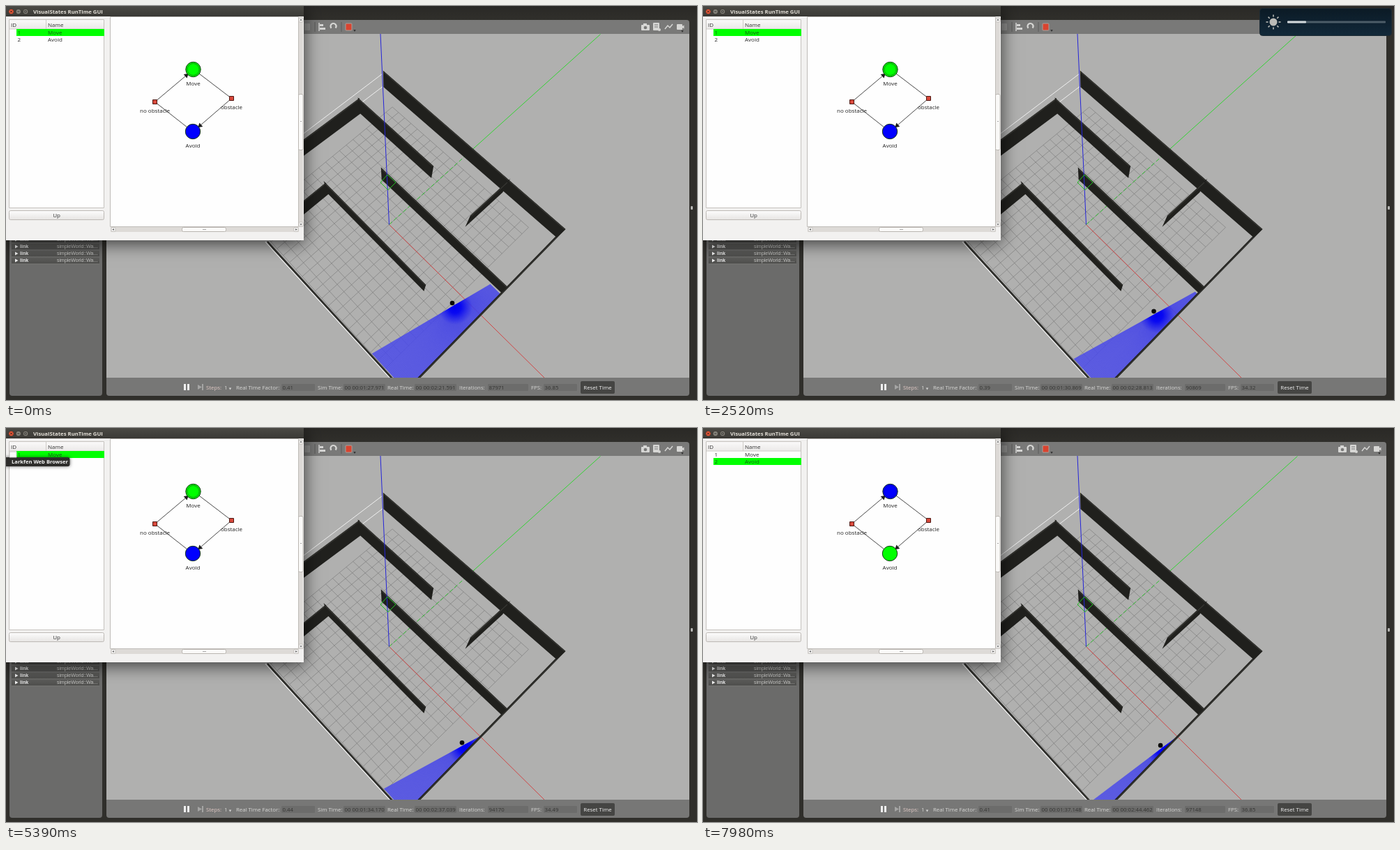
Recreate the animation shown at these times as an HTML page with a canvas. Size 991 by 565 pixels, loop 8 s.

```html
<!DOCTYPE html>
<html lang="en">
<head>
<meta charset="utf-8">
<title>Robot state machine</title>
<style>
html, body { margin: 0; width: 100%; height: 100%; overflow: hidden; background: #2f2e2a; }
canvas { display: block; }
</style>
</head>
<body>
<canvas id="stage" width="991" height="565"></canvas>
<script>
const ctx = document.getElementById('stage').getContext('2d');
const LOOP = 8000, TICK = 70;
const SWITCH = 6400;                       // Move -> Avoid
const UI = '"Open Sans", sans-serif', SMALL = '"Liberation Sans", sans-serif';
const FLOOR = [[709, 413], [590, 535], [558, 535], [470, 438], [640, 345]];
const NADIR = [555, 548];                  // vanishing point of the verticals

const ramp = (t, from, to) => Math.max(0, Math.min(1, (t - from) / (to - from)));
const mix = (a, b, k) => a.map((v, i) => v + (b[i] - v) * k);

function rect(x, y, w, h, fill, radius = 0, stroke) {
  ctx.beginPath();
  ctx.roundRect(x, y, w, h, radius);
  paint(fill, stroke);
}
function paint(fill, stroke, width = 1) {
  if (fill) { ctx.fillStyle = fill; ctx.fill(); }
  if (stroke) { ctx.strokeStyle = stroke; ctx.lineWidth = width; ctx.stroke(); }
}
function trace(points, close) {
  ctx.beginPath();
  points.forEach(([x, y]) => ctx.lineTo(x, y));
  if (close) ctx.closePath();
}
function poly(points, fill, stroke, width) { trace(points, true); paint(fill, stroke, width); }
function line(color, width, ...points) { trace(points); paint(null, color, width); }
function circle(x, y, r, fill, stroke, width) {
  ctx.beginPath();
  ctx.arc(x, y, r, 0, 7);
  paint(fill, stroke, width);
}
function triangle(x, y, size, angle, fill) {
  const corner = i => [x + size * Math.cos(angle + i * 2.1), y + size * Math.sin(angle + i * 2.1)];
  poly([0, 1, 2].map(corner), fill);
}
function text(s, x, y, color, size = 8, align = 'left', weight = 400, family = UI) {
  ctx.font = `${weight} ${size}px ${family}`;
  ctx.textAlign = align;
  ctx.fillStyle = color;
  ctx.fillText(s, x, y + size * .35);
}
function shade(y0, y1, top, bottom) {
  const g = ctx.createLinearGradient(0, y0, 0, y1);
  g.addColorStop(0, top);
  g.addColorStop(1, bottom);
  return g;
}

// Ground plane to screen, u along the red axis, v along the green one
function ground(u, v) {
  const w = 1 - .0566 * u + .0444 * v;
  return [549.5 + (96.2 * u + 101.3 * v) / w, 313.5 + (94.8 * u - 90.9 * v) / w];
}

// A wall is given by its top edge; its foot lies towards the nadir
function wall(a, b) {
  poly([a, b, mix(b, NADIR, .046), mix(a, NADIR, .046)], '#20201d', '#20201d', 2.2);
  line('#363632', 1.2, a, b);
}

// Scanner position and the slope of the scan's edge
function scanner(t) {
  const moved = Math.min(t, 6200);
  const drift = 1 - (1 - ramp(t, 0, 4200)) ** 2;
  const turn = ramp(t, SWITCH + 100, LOOP) ** 1.5;
  return [643 + .0026 * moved, 429 + .0047 * moved, -.588 + .041 * drift - .213 * turn];
}

// The part of the floor on the lower side of the scan's edge
function clipFloor(x, y, slope) {
  const depth = p => p[1] - y - slope * (p[0] - x);
  const out = [];
  FLOOR.forEach((a, i) => {
    const b = FLOOR[(i + 1) % FLOOR.length], da = depth(a), db = depth(b);
    if (da >= 0) out.push(a);
    if (da * db < 0) out.push(mix(a, b, da / (da - db)));
  });
  return out;
}

function laser(x, y, slope) {
  ctx.save();
  trace(clipFloor(x, y, slope), true);
  ctx.clip();
  ctx.fillStyle = 'rgba(76,76,236,.82)';
  ctx.fillRect(460, 340, 260, 195);
  const start = Math.atan(slope);
  for (let i = 0; i <= 180; i++) {
    const a = start + Math.PI * i / 180;
    line('rgba(30,30,225,.2)', .6, [x, y], [x + 220 * Math.cos(a), y + 220 * Math.sin(a)]);
  }
  const glow = ctx.createRadialGradient(x + 1, y + 3, 0, x + 1, y + 3, 25);
  glow.addColorStop(0, '#0000f4');
  glow.addColorStop(.35, 'rgba(0,0,244,.85)');
  glow.addColorStop(1, 'rgba(20,20,240,0)');
  ctx.fillStyle = glow;
  ctx.fillRect(x - 40, y - 40, 80, 80);
  ctx.restore();
}

function scene(t) {
  const [x, y, slope] = scanner(t);
  ctx.save();
  ctx.beginPath();
  ctx.rect(144, 40, 836, 493);
  ctx.clip();
  ctx.fillStyle = '#b0b0af';
  ctx.fillRect(144, 40, 836, 493);

  for (let k = -1; k < 1.01; k += .1) {
    line('#7f7f7e', .7, ground(k, -1), ground(k, 1));
    line('#7f7f7e', .7, ground(-1, k), ground(1, k));
  }
  line('#f0f0f0', 1, [420, 188], [540, 97]);
  line('#f0f0f0', 1, [420, 207], [541, 115]);

  const origin = ground(0, 0);
  line('#d04444', 1, origin, [772.5, 533.5]);
  ctx.setLineDash([6, 3]);
  line('#30c030', 1, origin, [672, 203]);
  ctx.setLineDash([]);
  line('#32d332', 1, [672, 203], [852.5, 40.5]);

  laser(x, y, slope);

  line('#f2f2f2', 1.3, [372, 338], [552, 535]);
  wall([375, 338], [555, 535]);
  wall([801, 320], [591, 535]);
  wall([542, 95], [801, 320]);
  wall([719, 253], [667, 301]);
  wall([420, 198], [506, 134]);
  wall([506, 134], [612, 230]);
  wall([539, 234], [718, 403]);
  wall([420, 286], [458, 255]);
  wall([458, 255], [601, 400]);

  line('#2424d8', 1, origin, [537, 40]);
  poly([[547, 242], [559, 253], [548, 264], [537, 253]], null, '#22c022', 1);
  circle(x - 3, y - 3, 3.3, '#080808');
  ctx.restore();
}

function toolbar() {
  const ink = '#d6d6d4', ground = '#797978';
  rect(144, 20, 836, 20, ground, [4, 4, 0, 0]);
  rect(428, 25, 8, 10, '#8f8f8e', 1);
  for (const x of [443, 481]) line('#5c5c5b', 1, [x, 23], [x, 37]);
  line(ink, 1.5, [449, 24], [449, 36]);
  rect(450, 26, 5, 3, ink);
  rect(450, 31, 8, 3, ink);
  ctx.beginPath();
  ctx.arc(469.5, 29, 4, 2.4, .7);
  paint(null, ink, 2.2);
  rect(487, 25, 9, 10, '#d9432f', 1, '#a8a19c');
  triangle(500, 35, 2, Math.PI / 2, '#333');

  rect(911, 27, 12, 8, ink, 1);
  rect(914, 25, 5, 3, ink);
  circle(917, 31, 2.3, ground);
  rect(928, 24, 9, 11, ink, 1);
  for (const y of [27, 30]) line(ground, 1, [930, y], [935, y]);
  circle(937, 34, 2, ink);
  line(ink, 1.5, [945, 33], [949, 28], [952, 31], [956, 26]);
  rect(962, 26, 8, 8, ink, 1);
  triangle(971, 30, 3, Math.PI, ink);
  triangle(970, 36, 2, Math.PI / 2, '#333');
}

function clock(seconds) {
  return '00 ' + new Date(Math.round(seconds * 1000)).toISOString().slice(11, 23);
}

function statusBar(t) {
  const sim = 87.971 + t * .00115, real = 141.591 + t * .002866;
  const wave = t * Math.PI / 2000;
  const label = '#d8d8d6';
  rect(144, 533, 836, 26, '#777776', [0, 0, 4, 4]);
  for (const x of [255, 260]) rect(x, 542, 3, 9, '#eee');
  triangle(277, 546.5, 4, 0, '#a5a5a4');
  rect(281, 542, 2, 9, '#a5a5a4');
  text('Steps:', 287, 547, '#e3cbc7', 7.8);
  text('1', 313, 547, label);
  triangle(321.5, 548.5, 2, Math.PI / 2, label);

  const field = (name, x, boxX, width, value) => {
    rect(boxX, 542, width, 10, '#6c6c6b', 1);
    text(name, x, 547, label, 7.8);
    text(value, boxX + 1.5, 547, '#343432', 7.8);
  };
  field('Real Time Factor:', 330, 395, 48, (.415 + .03 * Math.sin(wave)).toFixed(2));
  field('Sim Time:', 447, 484, 60, clock(sim));
  field('Real Time:', 547, 586, 60, clock(real));
  field('Iterations:', 650, 691, 58, Math.round(sim * 1000));
  field('FPS:', 753, 771, 48, (35.35 + 1.5 * Math.cos(wave)).toFixed(2));
  rect(824, 538, 49, 18, '#454543', 2);
  text('Reset Time', 848.5, 547, '#f2f2f2', 7.9, 'center');
}

function sidePanel() {
  rect(5, 20, 133, 539, '#6b6b6a', 4);
  for (let y = 335; y <= 365; y += 10) {
    rect(8, y - 4.5, 126, 9, shade(y - 5, y + 5, '#5e5e5c', '#4d4d4b'));
    line('#7c7c7a', .7, [8, y + 5], [134, y + 5]);
    triangle(14.5, y, 3, 0, '#f0f0f0');
    text('link', 20, y, '#eee', 7, 'left', 700, SMALL);
    text('simpleWorld::Wa...', 73, y, '#c8c8c6', 7, 'left', 400, SMALL);
  }
}

function transition(name, x, y, from, to) {
  const angle = Math.atan2(to[1] - y, to[0] - x), ink = '#1c1c1c';
  line(ink, .8, from, [x, y], to);
  triangle(to[0] - 3 * Math.cos(angle), to[1] - 3 * Math.sin(angle), 4.2, angle, ink);
  rect(x - 3, y - 3, 6, 6, '#d8493c', 0, '#4c1712');
  text(name, x, y + 12.5, '#222', 8, 'center');
}

function state(name, x, y, active, initial) {
  circle(x, y, 10.7, active ? '#00ff00' : '#0000ff', '#153515', 1);
  if (initial) circle(x, y, 8.6, null, active ? '#108010' : '#0000c4', .9);
  text(name, x, y + 20, '#222', 8, 'center');
}

function scrollButton(x, y, angle) {
  rect(x - 3, y - 3, 6, 6, '#f4f3f2', 1, '#c6c3bf');
  triangle(x, y, 1.7, angle, '#666');
}

function stateWindow(moving) {
  ctx.save();
  ctx.shadowColor = 'rgba(0,0,0,.7)';
  ctx.shadowBlur = 24;
  ctx.shadowOffsetY = 4;
  rect(0, 0, 427, 336, '#f2f1f0');
  ctx.restore();

  rect(0, 0, 427, 15, shade(0, 15, '#4b4a45', '#3a3935'));
  ['#e8593a', '#85837b', '#85837b'].forEach((color, i) =>
    circle(7.5 + 10.3 * i, 8, 3.8, color, '#34312d', .8));
  line('#4a2018', 1, [6, 6.5], [9, 9.5]);
  line('#4a2018', 1, [9, 6.5], [6, 9.5]);
  line('#3c3b37', 1, [16.3, 8], [19.3, 8]);
  rect(26.7, 6.7, 2.6, 2.6, null, 0, '#3c3b37');
  text('VisualStates RunTime GUI', 39, 8, '#e4e0d8', 7.75, 'left', 700);

  rect(4.5, 19.5, 136, 270, '#fefefe', 0, '#c5c2be');
  rect(5, 20, 135, 13, shade(20, 33, '#faf9f9', '#ebe9e8'));
  line('#cfccc8', 1, [5, 33], [140, 33]);
  line('#cfccc8', 1, [57.5, 20], [57.5, 33]);
  text('ID', 7, 27, '#333');
  text('Name', 60, 27, '#333');
  rect(15, moving ? 33 : 43, 126, 10, '#00ff00');
  ['Move', 'Avoid'].forEach((name, i) => {
    const y = 38.5 + 10 * i, ink = moving === (i === 0) ? '#116011' : '#2b2b2b';
    text(i + 1, 16.5, y, ink);
    text(name, 60, y, ink);
  });
  rect(4.5, 293.5, 136, 13, shade(293, 307, '#fdfdfd', '#e6e4e2'), 2, '#bdb9b5');
  text('Up', 72.5, 300, '#333', 8, 'center');

  rect(149.5, 15.5, 270, 301, '#fefefe', 0, '#bfbcb8');
  rect(420, 16, 6, 301, '#dddad7');
  rect(419.5, 126.5, 6.5, 80, '#faf9f8', 2, '#bab6b1');
  rect(150, 317, 270, 7, '#dddad7');
  rect(252.5, 317.5, 63, 6, '#faf9f8', 2, '#bab6b1');
  line('#aaa', 1, [282, 320.5], [287, 320.5]);
  line('#aaa', 1, [422, 165.5], [424, 165.5]);
  scrollButton(423, 20, -Math.PI / 2);
  scrollButton(423, 313, Math.PI / 2);
  scrollButton(154, 320.5, Math.PI);
  scrollButton(416, 320.5, 0);

  transition('obstacle', 323.5, 132.5, [277, 97], [276, 173.5]);
  transition('no obstacle', 213.5, 137.5, [260, 174], [261, 97.5]);
  state('Move', 268.5, 91, moving, true);
  state('Avoid', 268, 180, !moving, false);
}

function brightness(alpha) {
  if (!alpha) return;
  const ink = '#bbbbb7';
  ctx.save();
  ctx.globalAlpha = alpha;
  rect(798.5, 3.5, 189, 39, shade(3, 43, '#0b1a25', '#12293a'), 4, '#1c2a33');
  for (let a = 0; a < 6.2; a += Math.PI / 4) {
    const c = Math.cos(a), s = Math.sin(a);
    line(ink, 1.6, [818 + 7.5 * c, 23 + 7.5 * s], [818 + 10.5 * c, 23 + 10.5 * s]);
  }
  circle(818, 23, 5.5, ink);
  rect(838, 21.5, 141, 3, '#4d5d68', 1);
  rect(838, 21.5, 27, 3, '#d2d8db', 1);
  ctx.restore();
}

function tooltip() {
  ctx.save();
  ctx.shadowColor = 'rgba(0,0,0,.6)';
  ctx.shadowBlur = 5;
  rect(-4, 42, 95.5, 13, '#2e2d2b', 3);
  ctx.restore();
  rect(5, 34, 10, 8, '#fbfbfb', 0, '#c9c9c7');
  text('Larkfen Web Browser', 8, 48.5, '#f4f4f4', 7.6, 'left', 700);
}

function draw(t) {
  ctx.fillStyle = shade(0, 20, '#2a2926', '#302f2b');
  ctx.fillRect(0, 0, 991, 565);
  rect(982, 287, 3, 5, '#b5b5b2', 1);
  sidePanel();
  scene(t);
  toolbar();
  statusBar(t);
  stateWindow(t < SWITCH);
  brightness(ramp(t, 1330, 1540) * (1 - ramp(t, 3500, 3850)));
  if (t >= 4760 && t < 5670) tooltip();
}

function frame(now) {
  const t = now % LOOP;
  draw(t - t % TICK);
  requestAnimationFrame(frame);
}
requestAnimationFrame(frame);
</script>
</body>
</html>
```
